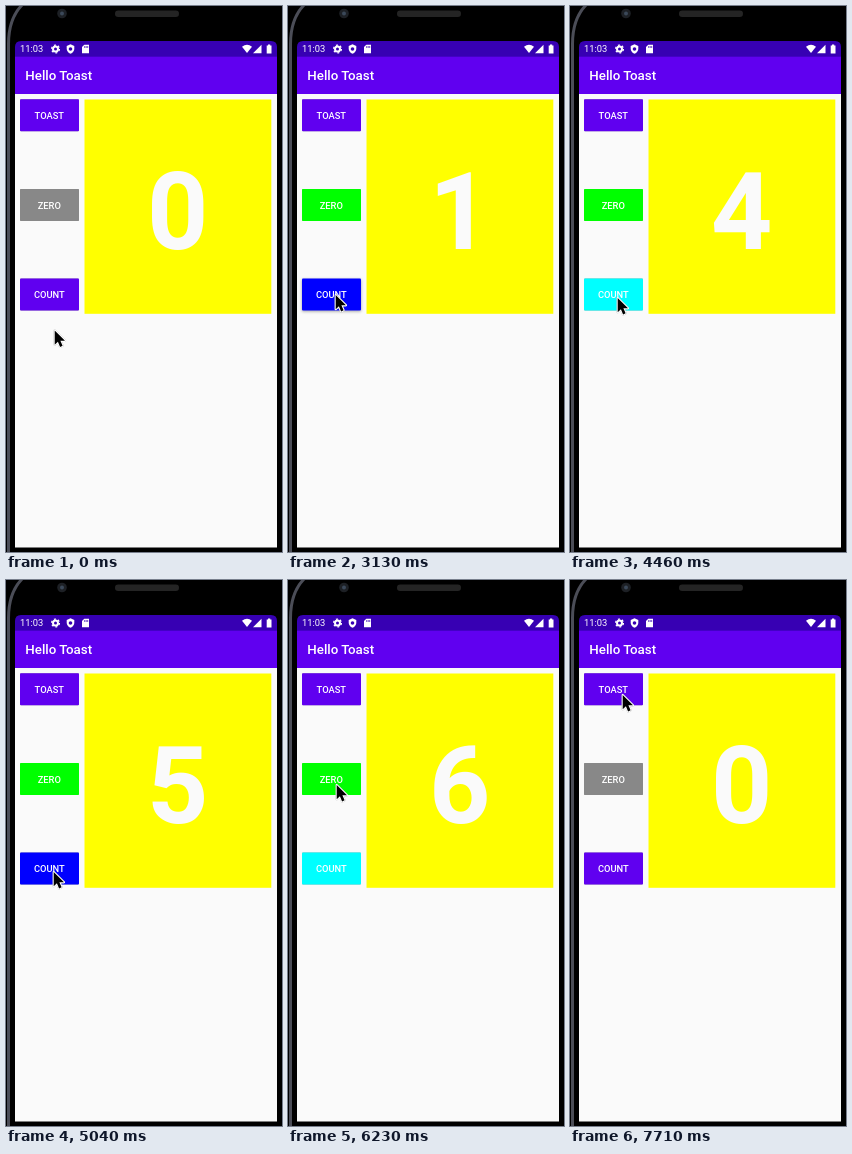
An HTML page for the animation above (8000 ms loop, 276x546 px).

```html
<!DOCTYPE html>
<html lang="en">
<head>
<meta charset="utf-8">
<title>Hello Toast</title>
<style>
  html, body { margin: 0; width: 100%; height: 100%; overflow: hidden; background: #000; }
  svg { display: block; width: 276px; height: 546px; }
  text { font-family: Roboto, sans-serif; fill: #fff; }
  .label { font-size: 9.33px; font-weight: 500; text-anchor: middle; }
  #digit { font-size: 107px; font-weight: 700; text-anchor: middle; fill: #fafafa; }
  #cursor { filter: drop-shadow(0 .8px .6px rgba(0,0,0,.4)); }
</style>
</head>
<body>
<svg viewBox="0 0 276 546">
  <!-- phone body -->
  <rect width="276" height="546"/>
  <path d="M2.500 546V38Q2.500 12 17 -2" fill="none" stroke="#4b4d57" stroke-width="3"/>
  <circle cx="56" cy="7.500" r="4.800" fill="#1d2025"/>
  <circle cx="56" cy="7.500" r="2" fill="#3b4859"/>
  <rect x="109" y="4.500" width="64" height="6.500" rx="3.200" fill="#242424"/>

  <!-- screen -->
  <path d="M9 51V41Q9 35 15 35H265Q271 35 271 41V51Z" fill="#3700b3"/>
  <rect x="9" y="50.700" width="262" height="37.300" fill="#6000f0"/>
  <rect x="9" y="88" width="262" height="453.500" fill="#fafafa"/>
  <text x="14" y="46.300" font-size="9.33">11:03</text>
  <text x="19.300" y="74.300" font-size="13.330" font-weight="500">Hello Toast</text>

  <!-- status icons -->
  <g fill="#fff">
    <circle cx="49.500" cy="43" r="2.500" fill="none" stroke="#fff" stroke-width="2"/>
    <circle cx="49.500" cy="43" r="3.900" fill="none" stroke="#fff" stroke-width="1.300" stroke-dasharray="2.040"/>
    <path d="M64.500 38.300L68.300 40V43Q68 46.300 64.500 47.800Q61 46.300 60.700 43V40Z"/>
    <circle cx="64.500" cy="43" r="1.800" fill="#3700b3"/>
    <path d="M78.300 38.800H83V47.300H76V41Z"/>
    <path d="M78.700 40V42M80.200 40V42M81.700 40V42" stroke="#3700b3" stroke-width=".7"/>
    <path d="M236 40.700Q241 36.800 246 40.700L241 47Z"/>
    <path d="M247 47.200L255.500 38.700V47.200Z"/>
    <path d="M260.700 39.500H262V38.500H264.200V39.500H265.500V47.500H260.700Z"/>
  </g>

  <!-- counter -->
  <rect x="78.500" y="93.500" width="186.800" height="214.300" fill="#ff0"/>
  <text id="digit" x="171.800" y="242.800">0</text>

  <!-- buttons -->
  <rect id="toast" x="14" y="93.300" width="59" height="32" rx="1"/>
  <text class="label" x="43.300" y="112.800">TOAST</text>
  <rect id="zero" x="14" y="183" width="59" height="32" rx="1"/>
  <text class="label" x="43.300" y="202.500">ZERO</text>
  <rect id="count" x="14" y="272.500" width="59" height="32" rx="1"/>
  <text class="label" x="43.300" y="292.200">COUNT</text>

  <path id="cursor" d="M1 1V15.200L4.200 12.200L6.400 17.400L8.900 16.300L6.700 11.300H11.300Z"
        stroke="#fff" stroke-width="2.200" stroke-linejoin="round" paint-order="stroke"/>
</svg>
<script>
const LOOP = 8000;
const STEP = 148.5; // the screen refreshes at this interval, in ms
const LEAD = 15;    // the first refresh comes slightly early
const PURPLE = "#6000f0";

// Times below are counted in refresh steps.
const TAPS = [21, 24, 27, 29, 33, 38];
const RESET = 45;

const easeOut = s => 1 - (1 - s) ** 2.2;
const easeInOut = s => 1 - (1 - s * s) ** 3.3;
const HOME = { x: 47.7, y: 323.5 };
const GLIDES = [
  { start: 1, steps: 3, x: 46.7, y: 288, ease: easeOut },
  { start: 26, steps: 1, x: 46.7, y: 291, ease: easeOut },
  { start: 38, steps: 4, x: 47.7, y: 204, ease: easeOut },
  { start: 48, steps: 4, x: 51.7, y: 114, ease: easeInOut }
];

const el = id => document.getElementById(id);

function cursorAt(step) {
  return GLIDES.reduce((from, to) => {
    const progress = Math.min(1, Math.max(0, (step - to.start) / to.steps));
    const k = to.ease(progress);
    return { x: from.x + (to.x - from.x) * k, y: from.y + (to.y - from.y) * k };
  }, HOME);
}

function paintButton(id, color, lifted) {
  const lift = lifted ? 1 : 0;
  el(id).style.fill = color;
  el(id).style.filter = `drop-shadow(0 ${0.7 + lift}px ${0.6 + lift * 0.8}px rgba(0,0,0,.35))`;
}

function draw(time) {
  const step = Math.floor((time % LOOP + LEAD) / STEP);
  const count = step < RESET ? TAPS.filter(tap => tap <= step).length : 0;
  const odd = count % 2 === 1;
  const { x, y } = cursorAt(step);

  el("digit").textContent = count;
  paintButton("toast", PURPLE, false);
  paintButton("zero", count ? "#0f0" : "#888", step >= RESET && step < RESET + 4);
  paintButton("count", !count ? PURPLE : odd ? "#00f" : "#0ff", odd && TAPS.includes(step));
  el("cursor").setAttribute("transform", `translate(${x} ${y})`);
}

const start = performance.now();
function tick() {
  draw(performance.now() - start);
  requestAnimationFrame(tick);
}
tick();
</script>
</body>
</html>
```
